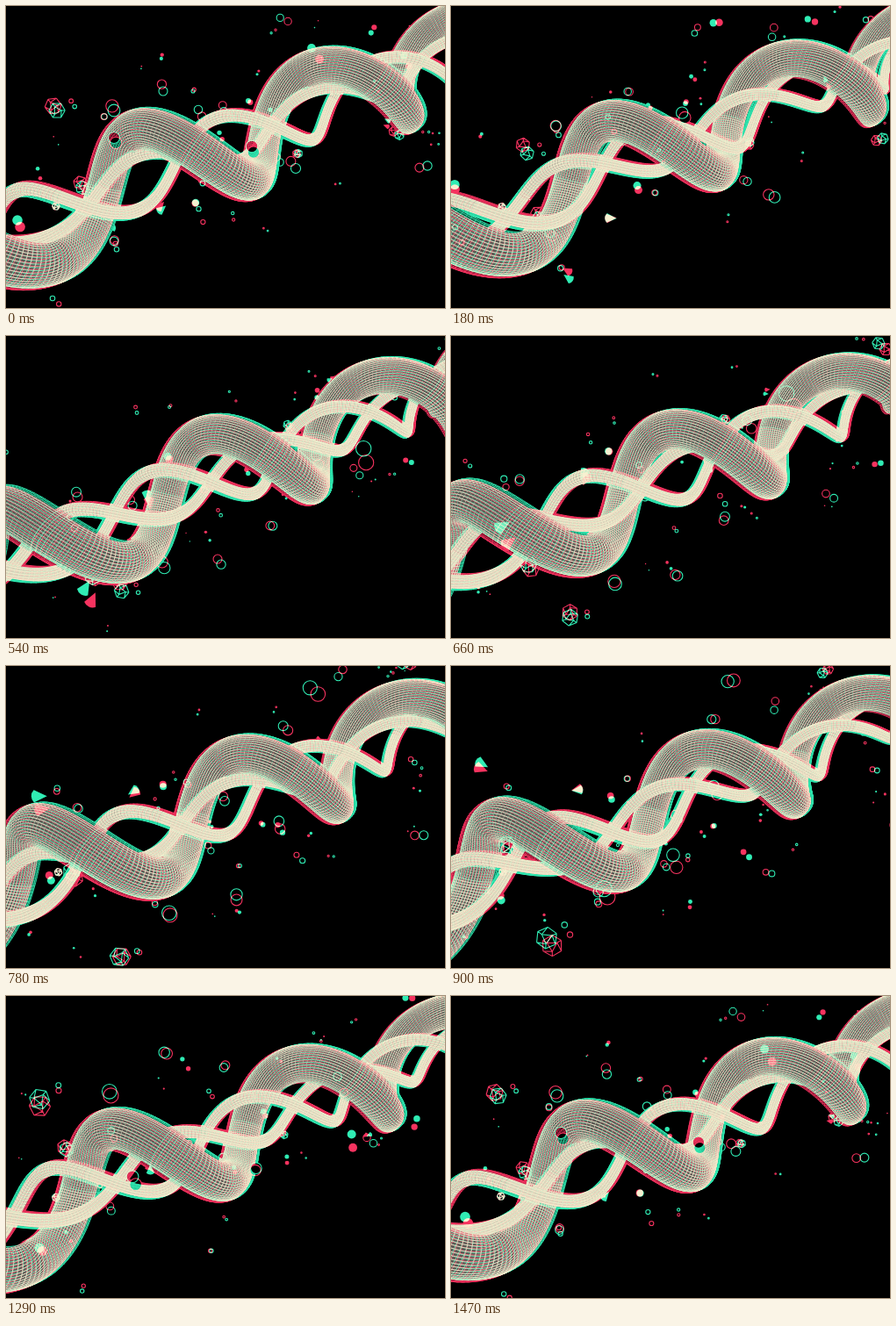
An HTML page with a canvas for the animation above (1.5 s loop, 500 by 344 pixels).

```html
<!DOCTYPE html>
<html>
<head>
<meta charset="utf-8">
<style>
html, body { margin: 0; width: 100%; height: 100%; overflow: hidden; background: #000; }
canvas { display: block; }
</style>
</head>
<body>
<canvas id="stage" width="500" height="344"></canvas>
<script>
const W = 500, H = 344, STEPS = 50, STEP_MS = 30, TAU = 2 * Math.PI;
const RED = '#f5335f', TEAL = '#30ecb4';
const CAMERA = 415, RISE = 77, RUN = 197, DEPTH = 47;
const RING = 0, DISC = 1, CONE = 2, ICOSA = 3, DARK = 4;

// s: periods along the axis, up: offset across it, near: offset towards the camera
const place = (s, up, near) => [
  RUN * s - 0.366 * up + 0.205 * near,
  -14 - RISE * s - 0.93 * up - 0.08 * near,
  DEPTH * s - 0.975 * near
];
const project = ([x, y, z]) => {
  const scale = 1 / (1 + z / CAMERA);
  return { x: 250 + x * scale, y: 172 + y * scale, z, scale };
};

// turn: direction in which the strand screws along the axis, shade: strength of the body under the mesh
const strands = [
  { radius: 49, tube: 21.5, phase: 0.42, turn: -1, rings: 96, lines: 24, width: 0.9, shade: 0.33 },
  { radius: 32, tube: 7, phase: 0.03, turn: 1, rings: 72, lines: 8, width: 1, shade: 0.85 },
  { radius: 23, tube: 7, phase: 0.46, turn: 1, rings: 72, lines: 8, width: 1, shade: 0.85 }
];

// x, y and nearness at the start of the loop, size, kind
const bodies = [
  [58, 119, -25, 9, ICOSA], [123, 119, -30, 7, RING], [112, 126, 10, 3, RING],
  [179, 97, -52, 5.5, RING], [213, 97, 0, 2, RING], [219, 118, 60, 4, RING],
  [248, 120, -60, 5, RING], [276, 108, 20, 3, DISC], [348, 48, 100, 4, DISC],
  [480, 182, 20, 5.5, RING], [312, 178, -60, 5, RING], [333, 168, 0, 5, ICOSA],
  [448, 147, -50, 7, ICOSA], [434, 130, 50, 4, CONE], [87, 207, -50, 8, ICOSA],
  [178, 231, -29, 7, CONE], [216, 224, 10, 4, DISC], [13, 244, 50, 4.5, DISC],
  [123, 268, 0, 4.5, RING], [57, 228, 0, 4, ICOSA], [53, 333, 70, 2, RING],
  [224, 202, -30, 3, RING], [123, 150, 45, 5.5, DARK], [280, 160, 50, 6, DARK],
  [453, 57, 90, 3.5, DISC], [119, 253, -97, 7, CONE], [330, 185, -88, 7, RING],
  [395, -20, 10, 5.5, RING]
].map(([x, y, near, size, kind], i) => {
  const u = x - 250, v = y - 172, w = 1 - 0.975 * near / CAMERA, c = DEPTH / CAMERA;
  const p = RUN - c * u, q = -RISE - c * v;
  const m = u * w - 0.205 * near, n = v * w + 14 + 0.08 * near;
  const det = -0.93 * p + 0.366 * q;
  const s = (-0.93 * m + 0.366 * n) / det, up = (p * n - q * m) / det;
  return { s, radius: Math.hypot(up, near), angle: Math.atan2(near, up), size, kind, spin: i };
});

let seed = 11;
const random = () => (seed = seed * 16807 % 2147483647) / 2147483647;
for (let i = 0; i < 34; i++) {
  bodies.push({
    s: random() * 2.7 - 1.1, radius: 50 + random() * 75, angle: random() * TAU,
    size: 0.7 + 3 * random() ** 2, kind: i % 2 ? RING : DISC, spin: i
  });
}

function strandBands(strand, t) {
  const { radius, tube, phase, turn, rings, lines, width, shade } = strand;
  const center = s => {
    const a = TAU * (s + phase + turn * t);
    return place(s, radius * Math.cos(a), radius * Math.sin(a));
  };
  const visibleRing = s => {
    const c = center(s), next = center(s + 0.001);
    const d = next.map((value, k) => value - c[k]);
    const length = Math.hypot(...d);
    const [tx, ty, tz] = d.map(value => value / length);
    const h = Math.hypot(tx, ty);
    const side = [-ty / h, tx / h, 0], front = [tz * tx / h, tz * ty / h, -h];
    const points = [];
    for (let j = 0; j <= lines; j++) {
      const a = Math.PI * j / lines;
      const cos = tube * Math.cos(a), sin = tube * Math.sin(a);
      points.push(project(c.map((value, k) => value + cos * side[k] + sin * front[k])));
    }
    return { z: c[2], points };
  };
  const bands = [];
  let last = visibleRing(-1.6);
  for (let i = 1; i <= 3.7 * rings; i++) {
    const ring = visibleRing(-1.6 + i / rings);
    bands.push({ z: ring.z, from: last.points, to: ring.points, width, shade });
    last = ring;
  }
  return bands;
}

function drawBand(g, { from, to, width, shade }, color) {
  g.beginPath();
  from.forEach(p => g.lineTo(p.x, p.y));
  [...to].reverse().forEach(p => g.lineTo(p.x, p.y));
  g.fillStyle = '#000';
  g.fill();
  g.globalAlpha = shade;
  g.fillStyle = color;
  g.fill();
  g.globalAlpha = 1;
  g.beginPath();
  to.forEach(p => g.lineTo(p.x, p.y));
  from.forEach((p, j) => {
    g.moveTo(p.x, p.y);
    g.lineTo(to[j].x, to[j].y);
  });
  g.lineWidth = width;
  g.stroke();
}

function drawBody(g, { x, y, r, kind, spin }, color) {
  const at = (a, k = 1) => [x + k * r * Math.cos(a), y + k * r * Math.sin(a)];
  g.lineWidth = 1.1;
  g.fillStyle = kind === DARK ? '#000' : color;
  g.beginPath();
  if (kind === CONE) {
    g.moveTo(...at(spin + Math.PI, 0.8));
    g.arc(x, y, r, spin - 0.8, spin + 0.8);
    g.closePath();
    g.fill();
  } else if (kind === ICOSA) {
    for (let k = 0; k < 6; k++) {
      const a = spin + k * TAU / 6, inner = spin + (k - k % 2) * TAU / 6;
      g.moveTo(...at(a));
      g.lineTo(...at(a + TAU / 6));
      g.moveTo(...at(a));
      g.lineTo(...at(inner, 0.55));
      g.lineTo(...at(inner + TAU / 3, 0.55));
    }
    g.stroke();
  } else {
    g.arc(x, y, r, 0, TAU);
    if (kind !== RING) g.fill();
    if (kind !== DISC) g.stroke();
  }
}

function makeCanvas() {
  const canvas = document.createElement('canvas');
  canvas.width = W;
  canvas.height = H;
  return canvas;
}

function renderLayer(t, color) {
  const canvas = makeCanvas(), g = canvas.getContext('2d');
  g.fillRect(0, 0, W, H);
  g.strokeStyle = color;
  const items = strands.flatMap(strand => strandBands(strand, t));
  for (const b of bodies) {
    const a = b.angle - TAU * t;
    const p = project(place(b.s, b.radius * Math.cos(a), b.radius * Math.sin(a)));
    items.push({ ...p, r: b.size * p.scale, kind: b.kind, spin: b.spin + TAU * t });
  }
  items.sort((a, b) => b.z - a.z);
  for (const item of items) (item.from ? drawBand : drawBody)(g, item, color);
  return canvas;
}

// Red trails teal by one step
function renderStep(i) {
  const canvas = makeCanvas(), g = canvas.getContext('2d');
  g.drawImage(renderLayer((i - 1) / STEPS, RED), 0, 0);
  g.globalCompositeOperation = 'screen';
  g.drawImage(renderLayer(i / STEPS, TEAL), 0, 0);
  return canvas;
}

const stage = document.getElementById('stage').getContext('2d');
const cache = [];
const start = performance.now();
function tick() {
  const i = Math.floor((performance.now() - start) / STEP_MS) % STEPS;
  cache[i] ??= renderStep(i);
  stage.drawImage(cache[i], 0, 0);
  requestAnimationFrame(tick);
}
tick();
</script>
</body>
</html>
```
